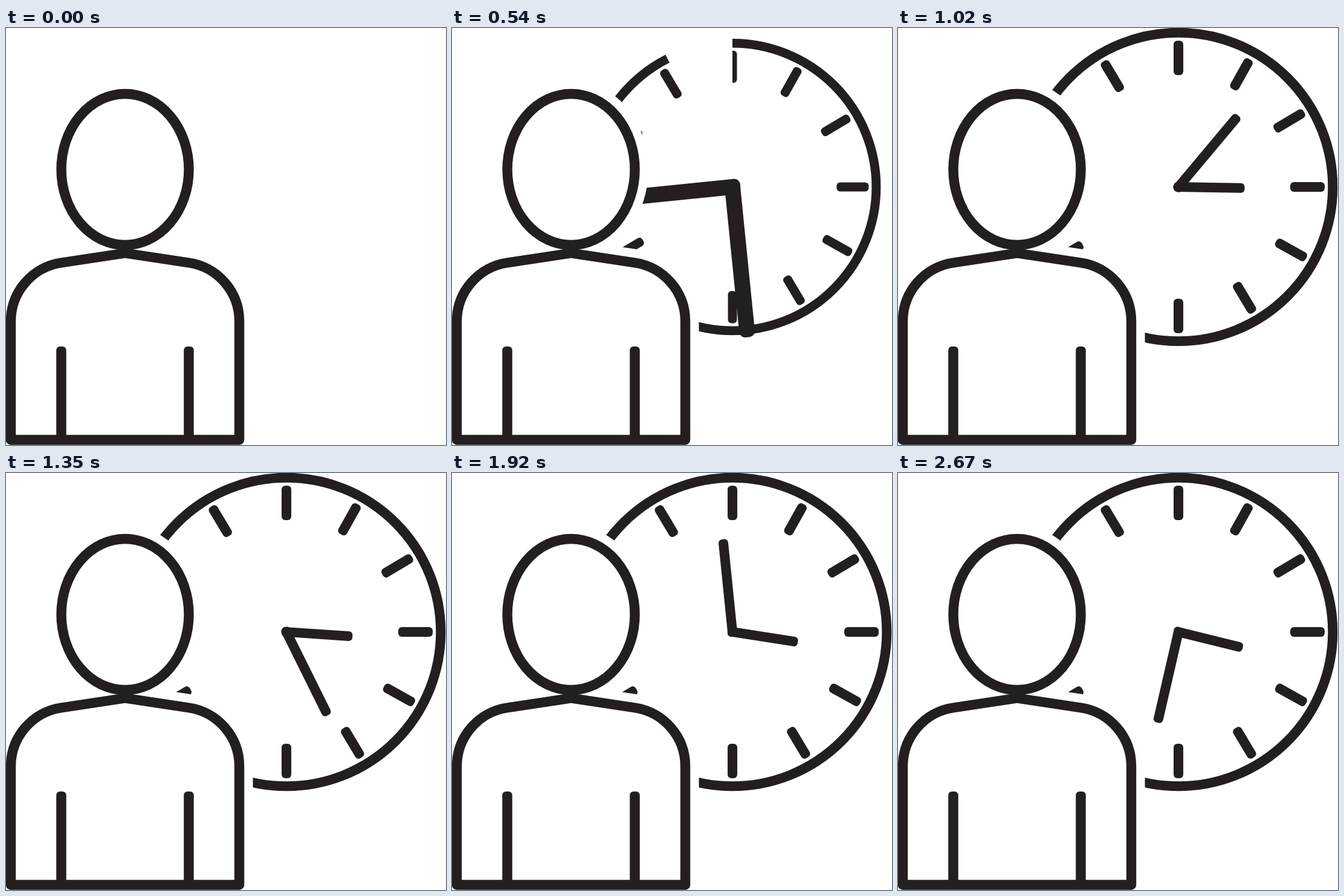
An HTML page with a canvas that plays this animation: 728 by 690 pixels, repeating every 2.7 s.

```html
<!DOCTYPE html>
<html lang="en">
<head>
<meta charset="utf-8">
<title>Person and clock</title>
<style>
  html, body { margin: 0; width: 100%; height: 100%; overflow: hidden; background: #fff; }
  canvas { display: block; }
</style>
</head>
<body>
<canvas id="stage" width="728" height="690"></canvas>
<script>
const ctx = document.getElementById('stage').getContext('2d');
const INK = '#231f20', LOOP = 2700, STEP = 30, TURN = Math.PI * 2;

const head = new Path2D();
head.ellipse(197, 234, 105.5, 125, 0, 0, TURN);
const body = new Path2D(
  'M8 681.5V485A98 98 0 0 1 91 388.5L197 372.5L303 388.5A98 98 0 0 1 386 485V681.5Z');
const arms = new Path2D();
for (const x of [83.2, 294.2]) arms.roundRect(x, 527, 16.5, 155, 6);

const progress = (t, start, length) => Math.min(1, Math.max(0, (t - start) / length));

// Easings, each from 0 to 1
const growFace = u => (1 - Math.exp(-4.66 * u)) / (1 - Math.exp(-4.66));
const overshoot = u => 1 + 6.3 * (1 - u) ** 2 - 7.3 * (1 - u) ** 3;
const sweep = u => 1 - (1 - u) ** 4;
const spin = u => 0.275 * u + 1.304 * u * u - 0.579 * u ** 3;

// Blunt bar along a clock direction, in degrees from twelve
function bar(degrees, from, to) {
  ctx.save();
  ctx.rotate(degrees * TURN / 360);
  ctx.beginPath();
  ctx.roundRect(-8, -to, 16, to - from, 6);
  ctx.fill();
  ctx.restore();
}

function atClockCentre(scale, draw) {
  if (scale <= 0) return;
  ctx.save();
  ctx.translate(464, 263);
  ctx.scale(scale, scale);
  draw();
  ctx.restore();
}

function drawFace(t) {
  atClockCentre(growFace(progress(t, 45, 900)), () => {
    const shown = sweep(progress(t, 33, 1062));
    if (shown < 1) {
      ctx.beginPath();
      ctx.moveTo(0, 0);
      ctx.arc(0, 0, 300, -TURN / 4, -TURN / 4 + shown * TURN);
      ctx.clip();
    }
    ctx.lineWidth = 16;
    ctx.beginPath();
    ctx.arc(0, 0, 255.3, 0, TURN);
    ctx.stroke();
    // Ticks between the quarters sit slightly early
    for (let hour = 0; hour < 12; hour++) bar(hour * 30 - (hour % 3 ? 0.8 : 0), 185, 242);
  });
}

function drawHands(t) {
  atClockCentre(overshoot(progress(t, 38, 930)), () => {
    const turn = 360 * spin(progress(t, 38, 867));
    const s = Math.max(0, t - 895) / 1000;
    const minutes = 310.5 * s + 80.1 * s * s - 44.8 * s ** 3;
    bar(turn + minutes, -8, 154);
    bar(turn + 90 + minutes / 40, -8, 109.5);
  });
}

function drawPerson() {
  // White halo that hides the clock behind the figure
  ctx.strokeStyle = ctx.fillStyle = '#fff';
  ctx.lineWidth = 45;
  for (const shape of [head, body]) {
    ctx.fill(shape);
    ctx.stroke(shape);
  }
  ctx.strokeStyle = ctx.fillStyle = INK;
  ctx.lineWidth = 16.4;
  for (const shape of [head, body]) ctx.stroke(shape);
  ctx.fill(arms);
}

function render(now) {
  const t = Math.floor(now % LOOP / STEP) * STEP;
  ctx.fillStyle = '#fff';
  ctx.fillRect(0, 0, 728, 690);
  ctx.strokeStyle = ctx.fillStyle = INK;
  ctx.lineJoin = 'round';
  drawFace(t);
  drawHands(t);
  drawPerson();
  requestAnimationFrame(render);
}
requestAnimationFrame(render);
</script>
</body>
</html>
```
